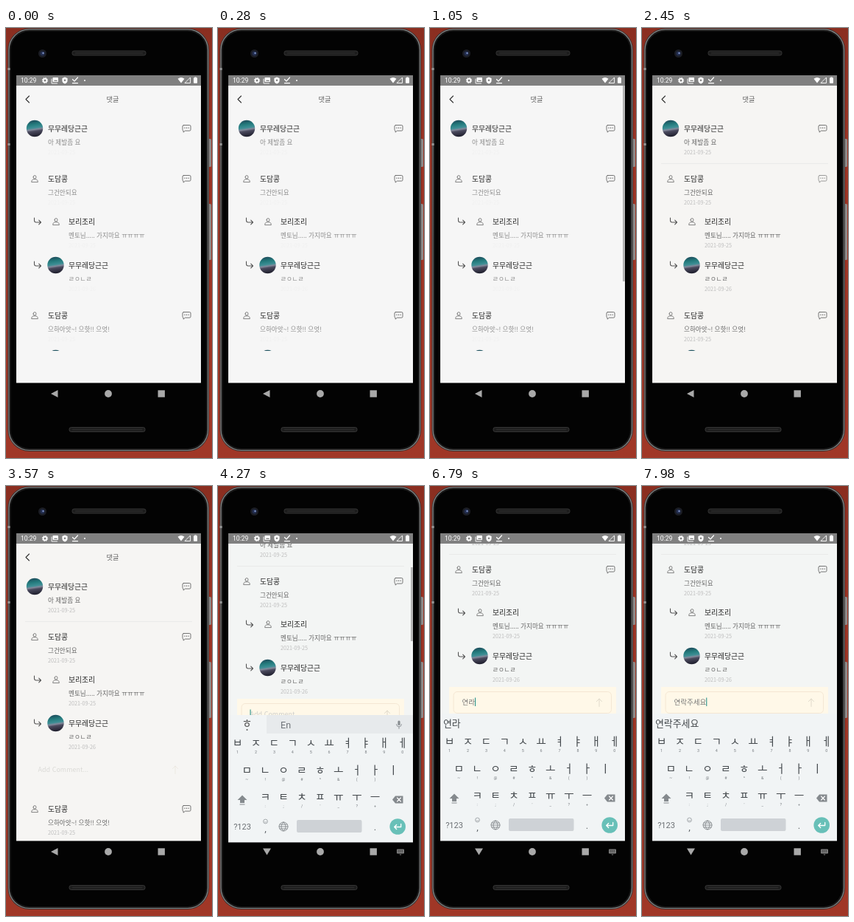
These frames come from a looping animation (280x582 px, 8000 ms). An HTML page:

```html
<!DOCTYPE html>
<html lang="ko">
<head>
<meta charset="utf-8">
<title>댓글</title>
<style>
html, body { margin: 0; width: 100%; height: 100%; overflow: hidden; background: #9b3425; }
svg { display: block; width: 280px; height: 582px; }
text { font-family: "Noto Sans CJK KR", "Noto Sans CJK", "Noto Sans", sans-serif; }
.latin { font-family: Roboto, sans-serif; }
.line { fill: none; stroke: #555; stroke-width: .9; stroke-linecap: round; stroke-linejoin: round; }
.body { fill: #666; }
.date { fill: #bdbdbd; }
.pale .body { fill: #8c8c8c; }
.pale .date { opacity: .1; }
.pale .rule { opacity: 0; }
</style>
</head>
<body>
<svg id="stage" viewBox="0 0 280 582" xmlns="http://www.w3.org/2000/svg"></svg>
<script>
const LOOP = 8000, STEP = 70;

const txt = (x, y, s, size, fill, extra = '') =>
  `<text x="${x}" y="${y + size * .36}" font-size="${size}" fill="${fill}" ${extra}>${s}</text>`;
const mid = 'text-anchor="middle"';
const rect = (x, y, w, h, fill, extra = '') =>
  `<rect x="${x}" y="${y}" width="${w}" height="${h}" fill="${fill}" ${extra}/>`;
const dot = (x, y, r, fill, extra = '') => `<circle cx="${x}" cy="${y}" r="${r}" fill="${fill}" ${extra}/>`;
const path = (d, extra = 'class="line"') => `<path d="${d}" ${extra}/>`;
const g = (id, inner, extra = '') => `<g id="${id}" ${extra}>${inner}</g>`;

// comment list
const avatar = (x, y) => dot(x, y, 11.2, 'url(#photo)');
const person = (x, y) => `<g transform="translate(${x} ${y})">` +
  path('M-2-2.2a2 2.2 0 1 0 4 0a2 2.2 0 1 0-4 0M-4.3 4.2c0-2.6 1.6-3.2 3.2-3.4h2.2c1.6.2 3.2.8 3.2 3.4z', 'class="line" style="stroke-width:.7"') + '</g>';
const bubble = (y, id) => g(id, path(`M241.5 ${y - 4.5}h8q1.5 0 1.5 1.5v4.6q0 1.5-1.5 1.5h-6l-2.4 2v-2q-1.1-.2-1.1-1.5v-4.6q0-1.5 1.5-1.5z`, 'class="line" style="stroke-width:.8"') +
  [243, 245.5, 248].map(x => dot(x, y - .8, .6, '#444')).join(''));
const words = (x, y, name, body, date) =>
  txt(x, y, name, 9.8, '#242424', 'font-weight="500"') +
  txt(x, y + 19, body, 8.6, '', 'class="body"') +
  txt(x, y + 32, date, 7.2, '', 'class="date"');
const hook = y => path(`M38.5 ${y - 5}v3.5q0 2.5 2.5 2.5h6.5m-2.8-2.8l2.8 2.8l-2.8 2.8`, 'class="line" style="stroke-width:1.1"');
const reply = (y, name, body, date, photo) =>
  hook(y) + (photo ? avatar(67.5, y) : person(68, y)) + words(85, y, name, body, date);

const A = '무무레당근근', B = '도담콩', C = '보리조리';
const top1 =
  path('M31.5 92l-4.5 4.5l4.5 4.5', 'class="line" style="stroke:#333;stroke-width:1.1"') +
  txt(145, 97, '댓글', 9.3, '#666', mid) +
  avatar(39, 136) + words(57, 136, A, '아 제발좀 요', '2021-09-25') + bubble(136, 'b1') +
  rect(26, 183, 227, .7, '#e6e6e6', 'class="rule"') +
  person(39, 204) + words(57, 204, B, '그건안되요', '2021-09-25') + bubble(204, 'b2') +
  reply(262, C, '멘토님..... 가지마요 ㅠㅠㅠㅠ', '2021-09-25') +
  reply(321, A, 'ㄹㅇㄴㄹ', '2021-09-26', true);
const rest =
  person(39, 389) + words(57, 389, B, '으하아앗~! 으핫!! 으엇!', '2021-09-25') + bubble(389, 'b3') +
  reply(447, A, 'ㄹㅇ ㅇㄹㄴㄹ ㅇㄹ', '2021-09-26', true);
const form =
  g('cream', rect(26, 363, 227, 38, '#fff8e8') +
    rect(32, 369.5, 214.5, 29, 'none', 'rx="5" stroke="#f1e2ce" stroke-width=".8"')) +
  g('hint', txt(43.5, 383.5, 'Add Comment...', 9, '#cfcfcb')) +
  txt(43.5, 383.5, '', 9.5, '#777', 'id="typed"') +
  rect(43.5, 377.5, 1.1, 11.5, '#2b948c', 'id="caret"') +
  path('M230 389.5v-10.5m-3.6 3.6l3.6-3.6l3.6 3.6', 'class="line" style="stroke:#ddd6c8" id="send"');

// keyboard
const keyRow = (x0, y, letters, marks) => [...letters].map((c, i) => {
  const x = x0 + i * 24.9;
  return txt(x, y, c, 14.8, '#454a4e', mid) +
    (marks[i] ? txt(x, y + 12, marks[i], 5.4, '#777c80', mid + ' class="latin"') : '');
}).join('');
const keys =
  rect(14, 308, 251, 180, '#f1f4f5') +
  g('tools', rect(66, 308, 199, 25, '#e7eaec') +
    txt(39.5, 319, 'ㅎ', 15.5, '#555', mid) + dot(39.5, 328, 1, '#555') +
    txt(85, 321, 'En', 12.6, '#70757a', 'class="latin"') +
    rect(244.4, 315.5, 3.2, 6.5, '#888d91', 'rx="1.6"') +
    path('M242.6 320.5a3.4 3.4 0 0 0 6.8 0M246 324v2.5', 'class="line" style="stroke:#888d91"')) +
  txt(18, 321, '', 12.9, '#44494d', 'id="suggest"') +
  keyRow(26.6, 346, 'ㅂㅈㄷㄱㅅㅛㅕㅑㅐㅔ', '1234567890') +
  keyRow(39.2, 383, 'ㅁㄴㅇㄹㅎㅗㅓㅏㅣ', '~!@#^&()') +
  keyRow(64.2, 419, 'ㅋㅌㅊㅍㅠㅜㅡ', ":;/'_?+") +
  path('M33 416.5l6.5 6.5h-3.5v4h-6v-4h-3.5z', 'fill="#858a8e"') + rect(29.5, 428.5, 7, 1, '#858a8e') +
  path('M237 422.5l4-5h10.5v10h-10.5z', 'fill="#858a8e"') +
  path('M243.5 420l5 5m0-5l-5 5', 'class="line" style="stroke:#fff;stroke-width:1.1"') +
  txt(33, 459, '?123', 11, '#6b7074', mid + ' class="latin"') +
  txt(64.5, 461, ',', 13, '#5f6468', mid + ' class="latin"') +
  dot(64.5, 452, 2.9, 'none', 'stroke="#858a8e" stroke-width=".7"') +
  path('M63 452.6q1.5 1.5 3 0', 'class="line" style="stroke:#858a8e;stroke-width:.6"') +
  path('M83 459a6 6 0 1 0 12 0a6 6 0 1 0-12 0h12M89 453c-4 4-4 8 0 12c4-4 4-8 0-12M84 456h10M84 462h10',
    'class="line" style="stroke:#787d81;stroke-width:.8"') +
  rect(107, 450, 88.5, 17, '#ced2d6', 'rx="2"') +
  txt(213.5, 459, '.', 13, '#5f6468', mid + ' class="latin"') +
  dot(244.2, 459, 10.8, '#68c0b8') +
  path('M248.7 455.5v4h-9m3-3l-3 3l3 3', 'class="line" style="stroke:#fff;stroke-width:1.3"');

// phone
const speaker = (x, y, w) => rect(x, y, w, 6, '#1d1d1d', 'rx="2.5" stroke="#353535" stroke-width="1"') +
  rect(x + 4, y + 2.2, w - 8, 1.6, '#2a2a2a');
const shell = (inset, fill, extra = '') =>
  rect(2.5 + inset, .5 + inset, 273.5 - 2 * inset, 572.5 - 2 * inset, fill, `rx="${29 - inset}" ${extra}`);
const phone =
  rect(0, 0, 280, 582, 'url(#desk)') +
  rect(274, 150, 5, 38, '#8f8d8c', 'rx="1.5"') + rect(274, 238, 5, 76, '#8f8d8c', 'rx="1.5"') +
  shell(0, '#333') + shell(1.5, '#1a1a1a', 'stroke="url(#rim)" stroke-width="1.2"') + shell(4, '#030303') +
  rect(2.5, 54, 3, 3, '#9a9a9a') + rect(2.5, 156, 3, 3, '#9a9a9a') +
  speaker(90, 31, 100) + speaker(86, 540.5, 103) +
  dot(49.5, 34.5, 5.5, '#1b1d24') + dot(49.5, 34.5, 3, '#232e50') + dot(50.5, 34, 1.2, '#7f93c6');

const status = rect(14, 64, 251, 14, '#808080') +
  txt(20, 71.2, '10:29', 8.6, '#fff', 'class="latin"') +
  dot(53, 71, 2.4, 'none', 'stroke="#fff" stroke-width="1.8"') +
  dot(53, 71, 3.7, 'none', 'stroke="#fff" stroke-width="1" stroke-dasharray="1.5 1.4"') +
  rect(63.5, 67, 7.5, 6, '#fff', 'rx=".7"') + path('M62 69v6h7.5', 'class="line" style="stroke:#fff"') +
  path('M65 72l1.7-2l1.2 1.2l1-1l1.3 1.8z', 'fill="#808080"') +
  path('M80 66.5l3.6 1.4v3q0 3-3.6 4.7q-3.6-1.7-3.6-4.7v-3z', 'fill="#fff"') + dot(80, 70.8, 1.3, '#808080') +
  path('M90.5 69.5l2.5 2.5l4.5-5M90.5 74.7h7', 'class="line" style="stroke:#fff;stroke-width:1.2"') +
  dot(107, 71, 1, '#fff') +
  path('M233.5 68.7q4.5-3.4 9 0l-4.5 5.8z', 'fill="#fff"') +
  path('M250.5 67v7.5h-7.5z', 'fill="none" stroke="#fff" stroke-width=".9"') +
  rect(255, 67.3, 5, 7.5, '#fff', 'rx=".7"') + rect(256.4, 66.4, 2.2, 1.2, '#fff');

const nav = g('navBar', rect(14, 480.4, 251, 30, '#030303')) +
  path('M70.5 490v10l-9.5-5z', 'fill="#a9a9a9" id="back"') +
  g('hide', path('M61 490.5h11l-5.5 9z', 'fill="#a9a9a9"') +
    rect(243, 491.5, 10, 6, '#808080', 'rx=".8"') +
    path('M244.5 493.3h7M244.5 495h7', 'stroke="#111" stroke-width=".9" stroke-dasharray="1 .9"') +
    path('M246.5 498.5h3l-1.5 1.5z', 'fill="#808080"')) +
  dot(139, 495, 4.9, '#a9a9a9') + rect(206.5, 490.3, 9.4, 9.4, '#a9a9a9');

document.getElementById('stage').innerHTML = `<defs>
  <linearGradient id="photo" x1="0" y1="0" x2=".15" y2="1">
    <stop offset="0" stop-color="#1c3f52"/><stop offset=".3" stop-color="#237a7c"/>
    <stop offset=".52" stop-color="#3d8f95"/><stop offset=".62" stop-color="#83899b"/>
    <stop offset=".72" stop-color="#4b4a5e"/><stop offset="1" stop-color="#242433"/></linearGradient>
  <linearGradient id="rim" x2="0" y2="1"><stop offset="0" stop-color="#8c8c8c"/>
    <stop offset=".5" stop-color="#6a6a6a"/><stop offset="1" stop-color="#858585"/></linearGradient>
  <linearGradient id="desk" x2="0" y2="1"><stop offset="0" stop-color="#8a2e20"/>
    <stop offset=".3" stop-color="#9b3425"/><stop offset="1" stop-color="#a03727"/></linearGradient>
  <clipPath id="screen"><rect x="14" y="78" width="251" height="405"/></clipPath>
  <clipPath id="listClip"><rect id="listBox" x="14" y="78" width="251" height="359"/></clipPath>
  </defs>` + phone +
  `<g clip-path="url(#screen)">` + rect(14, 64, 251, 420, '#f6f6f6', 'id="paper"') +
  `<g clip-path="url(#listClip)">` + g('list', top1 + g('form', form) + g('rest', rest)) + '</g>' +
  rect(262, 78, 2.8, 265, '#b3b3b3', 'id="bar"') + g('keys', keys) + '</g>' + status + nav;

// timeline: [ms, value] pairs
const scroll = [[420, 0], [490, 18], [560, 44], [630, 60], [700, 60], [770, 53], [840, 36], [910, 18], [980, 6], [1050, 0],
  [4130, 0], [4200, 45], [4270, 75], [4340, 84], [4410, 88], [4550, 91]];
const barFade = [[420, 0], [490, 1], [1470, 1], [1750, 0], [4130, 0], [4200, 1], [4830, 1], [5110, 0]];
const open = [[2590, 0], [2660, 8], [2730, 22], [2800, 35], [2870, 44], [2940, 48]];
const hintFade = [[2660, 0], [2940, .7], [3570, .7], [3640, 1]];
const press = [[2100, 1], [2170, .4], [2380, .4], [2520, 1]];
const rise = [[4060, 176], [4130, 110], [4200, 28], [4270, 2], [4340, 0]];
const typing = [[0, ''], [6160, 'ㅇ'], [6230, '여'], [6370, '연'], [6580, '연ㄹ'], [6720, '연라'], [7000, '연락'],
  [7070, '연락ㅈ'], [7210, '연락주'], [7350, '연락줏'], [7560, '연락주세'], [7630, '연락주셍'], [7910, '연락주세요']];

function at(keys, t) {
  if (t <= keys[0][0]) return keys[0][1];
  for (let i = 1; i < keys.length; i++) {
    const [a, u] = keys[i - 1], [b, v] = keys[i];
    if (t <= b) return u + (v - u) * (t - a) / (b - a);
  }
  return keys[keys.length - 1][1];
}

const el = id => document.getElementById(id);
const set = (id, name, value) => el(id).setAttribute(name, value);
const show = (id, on) => set(id, 'opacity', +on);
const move = (id, y) => set(id, 'transform', `translate(0 ${y})`);

function draw(now) {
  const t = Math.floor(now % LOOP / STEP) * STEP;
  const s = at(scroll, t), gap = at(open, t), lift = at(rise, t), focus = t >= 4060;
  const text = typing.filter(k => k[0] <= t).pop()[1];

  move('list', -s);
  move('rest', gap);
  set('listBox', 'height', 359 + gap);
  set('list', 'class', t < 2450 ? 'pale' : '');
  set('paper', 'fill', focus ? '#f3f5f4' : t >= 2450 ? '#f6f5f3' : '#f6f6f6');
  show('b2', at(press, t));

  set('bar', 'y', focus ? 110 + (s - 75) * .43 : 78 + s * .755);
  set('bar', 'height', focus ? 100 : 265);
  set('bar', 'opacity', at(barFade, t));

  show('form', at(hintFade, t));
  show('cream', focus);
  show('send', focus ? 1 : .6);
  show('hint', !text);
  el('typed').textContent = text;
  const blink = t < 4550 || t >= 5110 && t < 5670 || t >= 6160;
  show('caret', focus && blink);
  set('caret', 'x', 43.5 + (text ? el('typed').getComputedTextLength() : 0));

  move('keys', lift);
  show('keys', focus);
  move('navBar', focus ? Math.min(lift, 2) : 0);
  show('tools', !text);
  el('suggest').textContent = text;
  show('back', t < 4130);
  show('hide', t >= 4130);
}

function tick() {
  draw(performance.now());
  requestAnimationFrame(tick);
}
tick();
</script>
</body>
</html>
```
